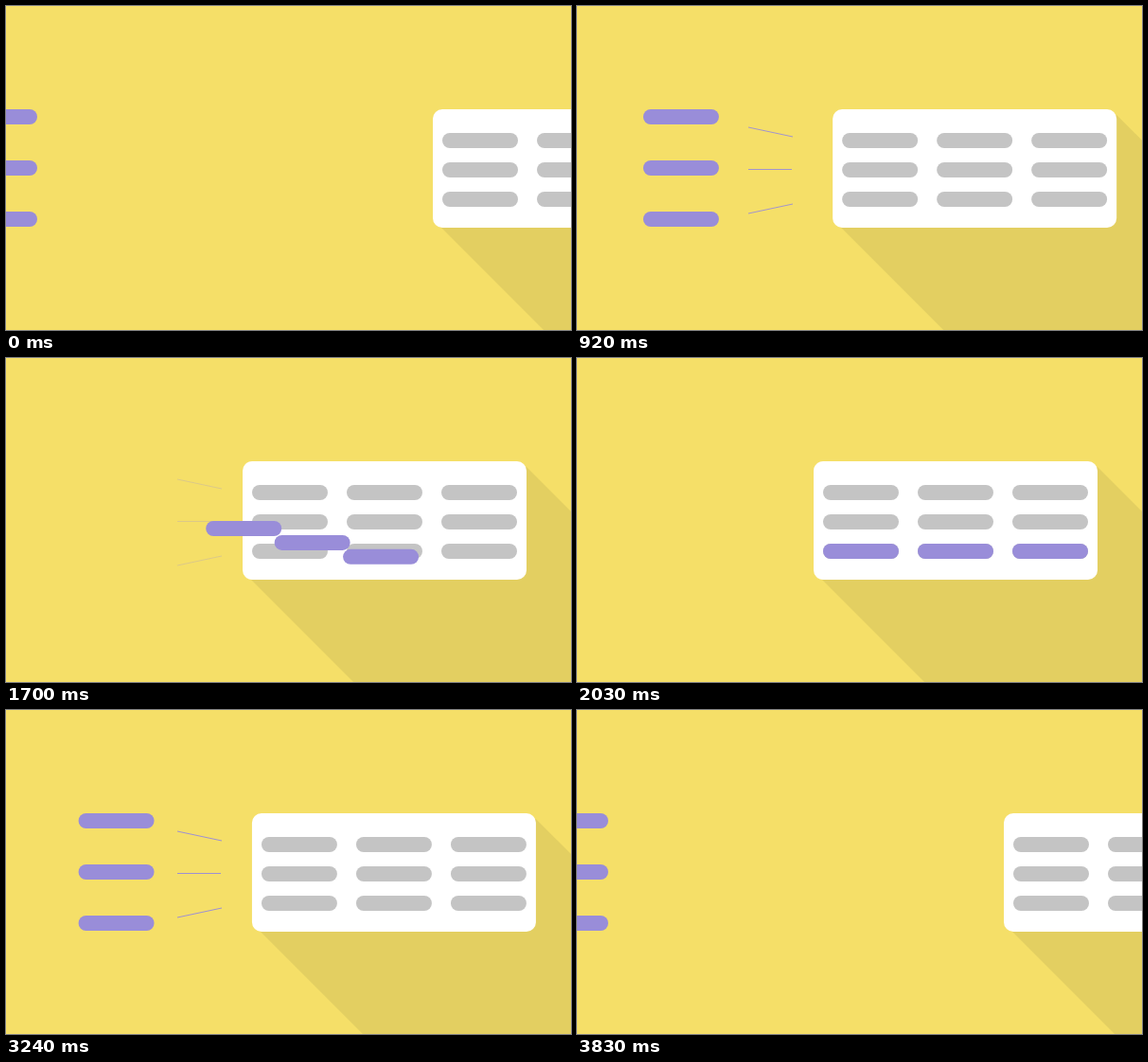
An HTML page that plays this animation: 597 by 342 pixels, repeating every 4.16 s.

```html
<!DOCTYPE html>
<html lang="en">
<head>
<meta charset="utf-8">
<title>Pills and card</title>
<style>
  html, body { margin: 0; width: 100%; height: 100%; overflow: hidden; background: #f5df68; }
  svg { display: block; }
</style>
</head>
<body>
<svg width="597" height="342" viewBox="0 0 597 342">
  <defs><rect id="pill" width="80" height="16" rx="8"/></defs>
  <g id="card">
    <path d="M9 234 L300 115 L600 415 L309 534Z" fill="#e3cf61"/>
    <rect y="109" width="300" height="125" rx="10" fill="#fff"/>
    <g id="cells" fill="#c4c4c4"></g>
  </g>
  <path id="lines" d="M181 128 L228 138 M181 172.5 H227 M181 219 L228 209" stroke="#998dd9" fill="none"/>
  <g id="pills" fill="#998dd9"></g>
</svg>
<script>
const LOOP = 4160, STEP = 45, DURATION = 600;
const $ = id => document.getElementById(id);

function addPill(parent, x = 0, y = 0) {
  const use = document.createElementNS('http://www.w3.org/2000/svg', 'use');
  use.setAttribute('href', '#pill');
  parent.append(use);
  place(use, x, y);
  return use;
}

function place(el, x, y) {
  el.setAttribute('transform', `translate(${x} ${y})`);
}

const mix = (a, b, k) => a + (b - a) * k;

// Quadratic ease-out, advanced in short steps; lead is the time already run at the first step.
function tween(t, start, lead) {
  if (t < start) return 0;
  const elapsed = lead + Math.floor((t - start) / STEP) * STEP;
  return 1 - (1 - Math.min(elapsed / DURATION, 1)) ** 2;
}

for (const y of [134, 165, 196])
  for (const x of [10, 110, 210]) addPill($('cells'), x, y);

const pills = [0, 1, 2].map(() => addPill($('pills')));

function draw(t) {
  const enter = tween(t, 560, 50) - tween(t, 3240, 15);
  const drop = tween(t, 1420, 15) - tween(t, 2360, 17);

  place($('card'), mix(451, 250, enter), 0);
  $('lines').setAttribute('opacity', enter - drop);
  pills.forEach((pill, i) => place(pill,
    mix(mix(-47, 83, enter), 260 + 100 * i, drop),
    mix(109 + 54 * i, 196, drop)));
}

const origin = performance.now();
function frame() {
  draw((performance.now() - origin) % LOOP);
  requestAnimationFrame(frame);
}
frame();
</script>
</body>
</html>
```
